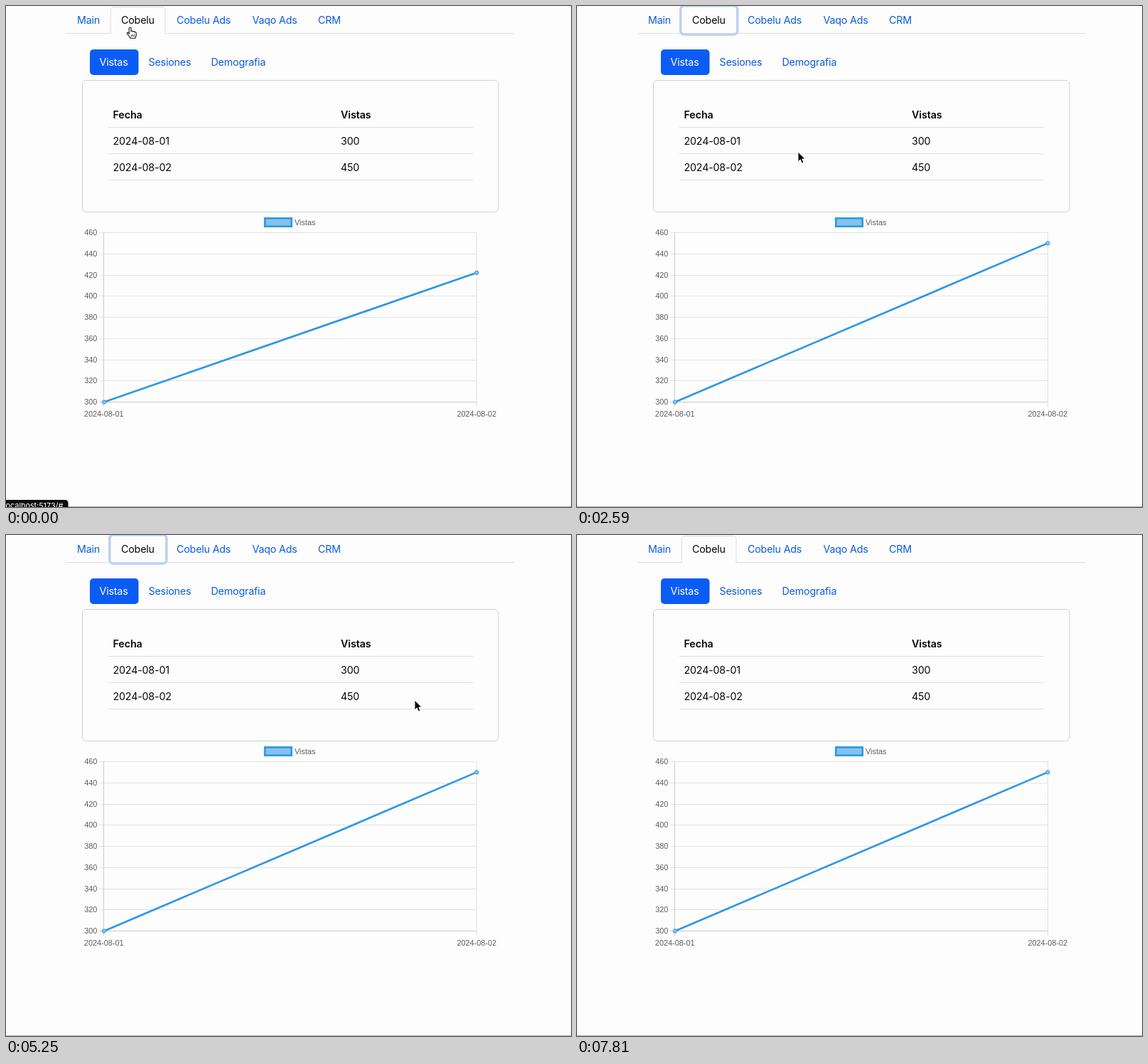
An HTML page that plays this animation: 795 by 704 pixels, repeating every 7830 ms.

```html
<!DOCTYPE html>
<html lang="es">
<head>
<meta charset="utf-8">
<title>Panel</title>
<style>
  html, body { margin: 0; width: 100%; height: 100%; overflow: hidden; background: #fdfdfd; }
  svg { display: block; width: 100vw; height: 100vh; }
  text { font: 14.3px Inter, sans-serif; letter-spacing: -0.2px; fill: #080808; }
  .link { fill: #0a5be0; }
  .head { font-weight: 600; letter-spacing: -0.1px; }
  .tick { font: 10.9px "Liberation Sans", Arial, sans-serif; letter-spacing: 0; fill: #5c5c5c; }
  .url { font-size: 11px; fill: #fff; letter-spacing: -0.1px; }
  .rule { stroke: #dddfd8; }
  .grid { stroke: #e2e2e4; }
  .axis { stroke: #cbccc0; }
</style>
</head>
<body>
<svg id="stage" viewBox="0 0 795 704">
  <rect width="795" height="704" fill="#fdfdfd"/>
  <g id="page"></g>
  <g id="tab">
    <path d="M85 38.5H147.5V6.5Q147.5 1.5 152.5 1.5H219Q224 1.5 224 6.5V38.5H715" fill="none" stroke="#dcdfda"/>
  </g>
  <rect id="ring" x="145.8" y="-0.3" width="80" height="40.3" rx="5" fill="#fdfdfd" stroke="#bfd0f4" stroke-width="3.6"/>
  <g id="labels"></g>
  <g id="chart"></g>
  <g stroke="#2f97e6">
    <path id="line" fill="none" stroke-width="2.7"/>
    <circle cx="138" cy="556.5" r="2.7" fill="#86c3f0"/>
    <circle id="dot" cx="662.3" r="2.7" fill="#86c3f0"/>
  </g>
  <path d="M0 703.5H795" stroke="#aeaeaa"/>
  <g id="status">
    <path d="M0 694H83Q87.5 694 87.5 698.5V704H0Z" fill="#0c0a0d"/>
    <text class="url" x="-3" y="706">localhost:5173/#</text>
  </g>
  <g id="hand" transform="translate(169 29)">
    <path d="M4.2 10.2V2.6C4.2 .5 7 .5 7 2.6V6.6C7.4 5.7 9.2 5.8 9.5 7C10.2 6.2 11.8 6.5 12 7.7C12.9 7.2 14.2 7.8 14.2 9.3V12C14.2 13.8 12.9 14.4 12.8 16.3H6C5.7 14.3 3 12.4 1.6 10.2C.5 8.4 2.4 7.4 3.3 8.8Z"
      fill="#fff" stroke="#111" stroke-width="1.1" stroke-linejoin="round"/>
    <path d="M7.5 11V14M9.5 11V14M11.4 11V14" stroke="#111" stroke-width=".8"/>
  </g>
  <g id="arrow">
    <path d="M0 0V14L3.2 11L5.3 15.9L8 14.8L5.9 10H10.2Z" fill="#0a0a0a" stroke="#fff" stroke-width="1" stroke-linejoin="round"/>
  </g>
</svg>
<script>
const LOOP = 7830;
const NS = "http://www.w3.org/2000/svg";
const $ = id => document.getElementById(id);

function add(parent, tag, attrs, text) {
  const el = document.createElementNS(NS, tag);
  for (const key in attrs) el.setAttribute(key, attrs[key]);
  if (text) el.textContent = text;
  return $(parent).appendChild(el);
}
const label = (x, y, text, cls = "") => add("labels", "text", { x, y, class: cls }, text);
const tick = (x, y, text, anchor) =>
  add("chart", "text", { x, y, class: "tick", "text-anchor": anchor }, text);
const stroke = (parent, d, cls) => add(parent, "path", { d, class: cls, fill: "none" });

// Tabs, pills and table
add("page", "rect", { x: 118, y: 61, width: 68.5, height: 36, rx: 5, fill: "#0b5cf5" });
add("page", "rect", { x: 107.5, y: 104.5, width: 585.5, height: 185, rx: 5.5, fill: "none", stroke: "#d0d1ca" });
for (const y of [170.5, 207.5, 244.5]) stroke("page", `M144 ${y}H657`, "rule");

label(100, 25, "Main", "link");
label(162, 25, "Cobelu");
label(240, 25, "Cobelu Ads", "link");
label(346.5, 25, "Vaqo Ads", "link");
label(439, 25, "CRM", "link");
label(131.5, 84, "Vistas").style.fill = "#fff";
label(200.5, 84, "Sesiones", "link");
label(288.5, 84, "Demografia", "link");

[["Fecha", "Vistas"], ["2024-08-01", "300"], ["2024-08-02", "450"]].forEach((row, i) =>
  row.forEach((cell, j) => label(j ? 471 : 150.5, 157.5 + 37 * i, cell, i ? "" : "head")));

// Chart frame
const yOf = value => 556.5 - (value - 300) * 238 / 160;
for (let v = 300; v <= 460; v += 20) {
  const y = Math.floor(yOf(v)) + 0.5;
  stroke("chart", `M131 ${y}H662`, v > 300 ? "grid" : "axis");
  tick(128.3, y + 3.7, String(v), "end");
}
stroke("chart", "M137.5 318V563", "axis");
stroke("chart", "M662.5 318V563", "grid");
tick(137.7, 577, "2024-08-01", "middle");
tick(662.3, 577, "2024-08-02", "middle");
add("chart", "rect", { x: 364.3, y: 298.3, width: 37.4, height: 11.4, fill: "#84c2ef", stroke: "#319bdc", "stroke-width": 2.7 });
tick(406, 307.7, "Vistas", "start");

const clamp = x => Math.max(0, Math.min(1, x));
const smooth = x => x * x * (3 - 2 * x);
const show = (id, on) => $(id).setAttribute("visibility", on ? "visible" : "hidden");

// Pointer moves: start, end, x, y reached
const moves = [
  [2950, 3450, 508, 213],
  [4200, 4600, 575, 232],
  [6650, 6850, 590, 632]
];

function pointer(t) {
  let x = 311, y = 205;
  for (const [start, end, tx, ty] of moves) {
    const k = smooth(clamp((t - start) / (end - start)));
    x += (tx - x) * k;
    y += (ty - y) * k;
  }
  return `translate(${x} ${y})`;
}

// The line rises with a quartic ease-out, then rests until it settles
function growth(t) {
  if (t >= 670) return 1;
  const step = t >= 160 ? 4 : Math.min(3, Math.floor(t / 20));
  return 1 - (1 - 0.344 - 0.04 * step) ** 4;
}

function draw(t) {
  const y = yOf(300 + 150 * growth(t));
  $("line").setAttribute("d", `M138 556.5L662.3 ${y}`);
  $("dot").setAttribute("cy", y);
  $("status").setAttribute("opacity", 1 - clamp((t - 810) / 200));
  show("ring", t >= 2450 && t < 5810);
  show("hand", t < 670);
  show("arrow", t >= 670 && t < 6900);
  $("arrow").setAttribute("transform", pointer(t));
}

const begin = performance.now();
function frame() {
  draw((performance.now() - begin) % LOOP);
  requestAnimationFrame(frame);
}
frame();
</script>
</body>
</html>
```
